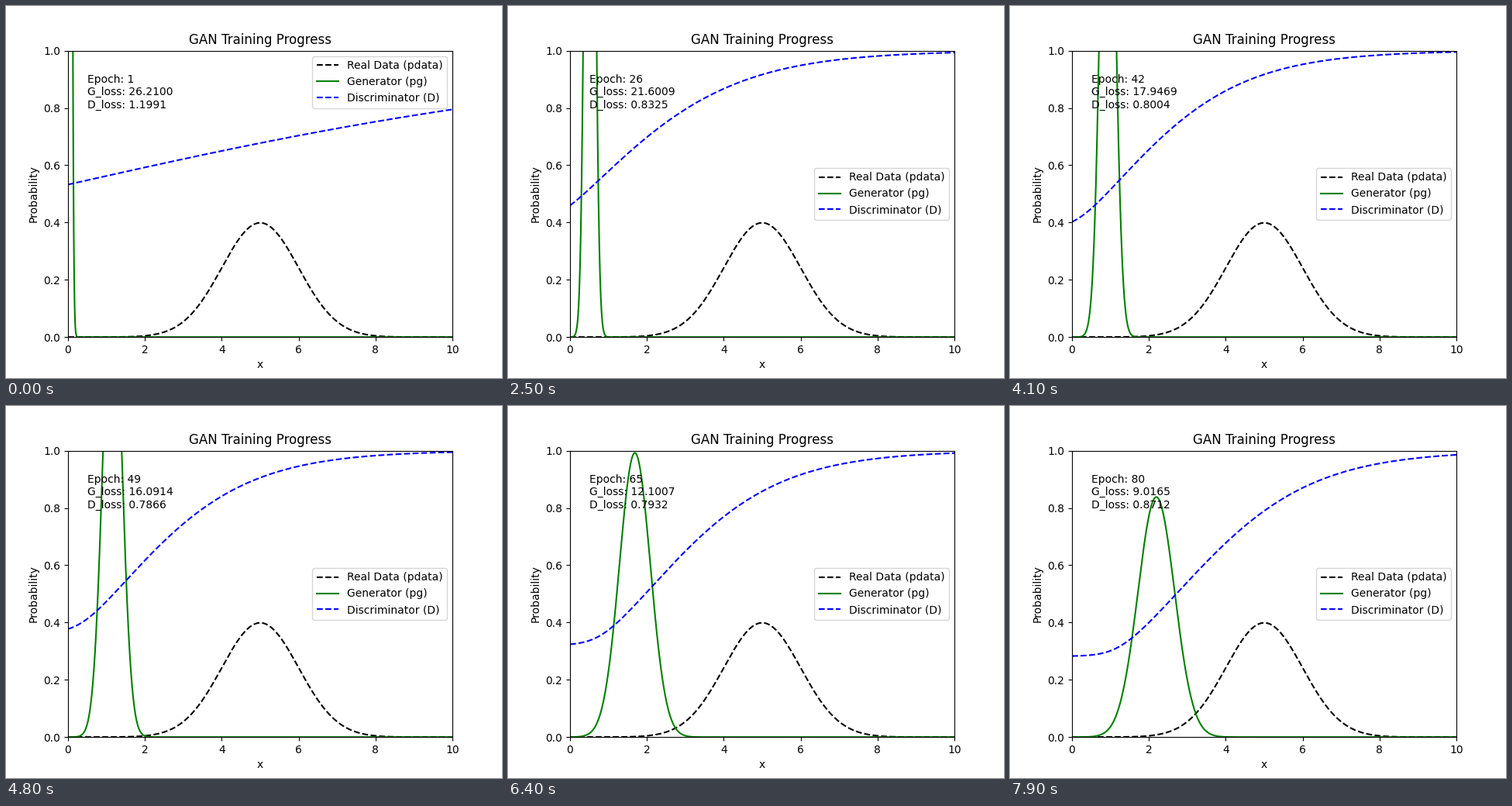
A matplotlib script for the animation above (8000 ms loop, 640 px wide and 480 px high).

```python
import numpy as np
import matplotlib.pyplot as plt
from matplotlib.animation import FuncAnimation

FRAMES, INTERVAL = 80, 100

# Key points of the printed losses: epoch, generator, discriminator
LOSSES = np.array([
    (1, 26.21, 1.1991), (15, 23.588, 0.895), (26, 21.6009, 0.8325),
    (42, 17.9469, 0.8004), (56, 14.2359, 0.7729), (65, 12.1007, 0.7932),
    (80, 9.0165, 0.8712),
]).T


def normal(x, mu, sigma):
    return np.exp(-0.5 * ((x - mu) / sigma) ** 2) / (sigma * np.sqrt(2 * np.pi))


def sigmoid(z):
    return 1 / (1 + np.exp(-z))


def ramp(x, knee, width):
    """Zero before the knee, unit slope after it, rounded in between."""
    return width * np.logaddexp(0, (x - knee) / width)


def generator(x, step):
    """Gaussian whose mean speeds up and whose spread grows in an S-curve."""
    mu = 0.025 + 0.0193 * step + 0.0144 * ramp(step, 34.3, 5)
    sigma = 0.05 + 0.0022 * step + 0.26 * sigmoid((step - 53) / 7.5)
    return normal(x, mu, sigma)


def discriminator(x, step):
    """Sigmoid that sinks at x = 0, steepens and bends ever further right."""
    t = step / (FRAMES - 1)
    start = 0.13 - 1.06 * t + 0.35 * t * (1 - t) * (1 - 1.4 * t)
    slope = 0.1225 + 0.545 * np.tanh(step / 24) - 0.0011 * step
    knee = 0.0275 * step - 1.07
    return sigmoid(start + slope * (ramp(x, knee, 0.3) - ramp(0, knee, 0.3)))


x = np.linspace(0, 10, 1000)
fig, ax = plt.subplots(figsize=(6.4, 4.8), dpi=100)
ax.plot(x, normal(x, 5, 1), "k--", label="Real Data (pdata)")
gen, = ax.plot(x, 0 * x, "g-", label="Generator (pg)")
disc, = ax.plot(x, 0 * x, "b--", label="Discriminator (D)")
ax.set(xlim=(0, 10), ylim=(0, 1), xlabel="x", ylabel="Probability",
       title="GAN Training Progress")
info = ax.text(0.5, 0.8, "")
legend = ax.legend(loc="upper right")


def update(step):
    epoch = step + 1
    d = discriminator(x, step)
    gen.set_ydata(generator(x, step))
    disc.set_ydata(d)
    # The legend steps aside once the discriminator curve reaches it
    legend.set_loc("upper right" if d[-1] < 0.797 else "center right")
    g_loss, d_loss = (np.interp(epoch, LOSSES[0], row) for row in LOSSES[1:])
    info.set_text(f"Epoch: {epoch}\nG_loss: {g_loss:.4f}\nD_loss: {d_loss:.4f}")
    return gen, disc, info, legend


anim = FuncAnimation(fig, update, frames=FRAMES, interval=INTERVAL,
                     repeat=True, repeat_delay=0, blit=False)
plt.show()
```
